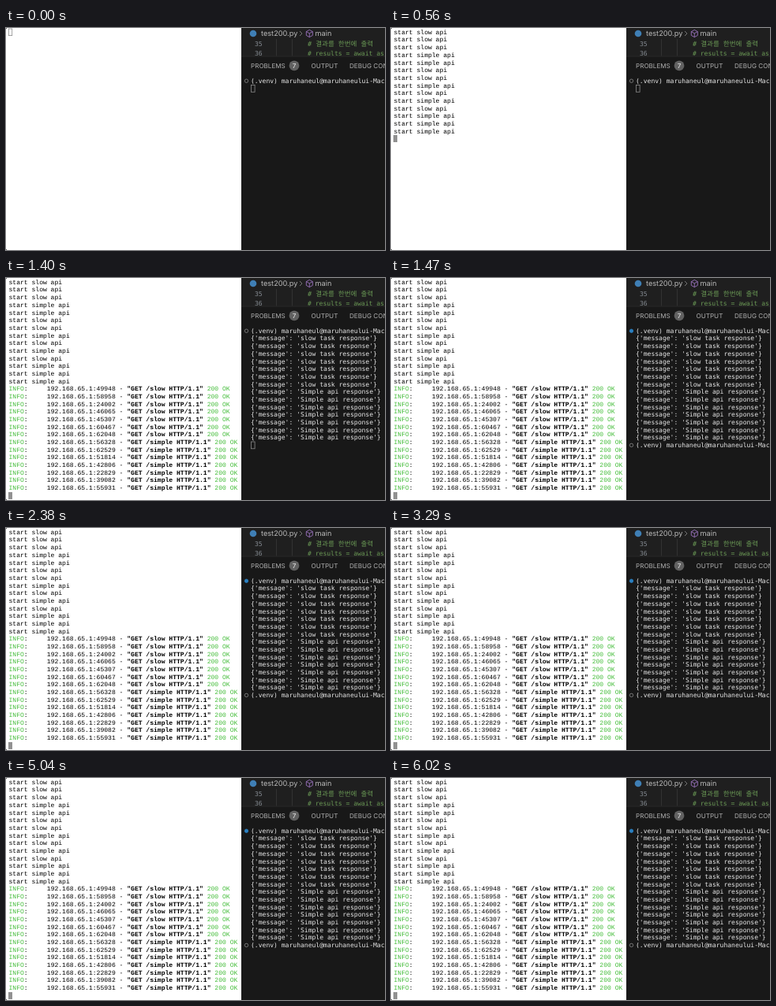
An HTML page for the animation above (6090 ms loop, 480 by 282 pixels).

```html
<!DOCTYPE html>
<html lang="en">
<head>
<meta charset="utf-8">
<title>Async requests in two terminals</title>
<style>
html, body { margin: 0; width: 100%; height: 100%; overflow: hidden; background: #fff; }
svg { display: block; width: 480px; height: 282px; text-rendering: geometricPrecision; }
text { white-space: pre; font: 8.05px "Liberation Mono", monospace; }
.right text { font: 8.06px "DejaVu Sans Mono", "Noto Sans Mono", monospace; fill: #e8e8e8; }
.right .code { fill: #6a9955; }
.right .korean { font-family: "DejaVu Sans Mono", "Noto Sans CJK KR", "Noto Sans CJK JP", sans-serif; font-size: 8.5px; }
.right .num { fill: #858b92; }
.right .ui { font: 9.2px Inter, Roboto, sans-serif; fill: #b9b9b9; }
.right .tab { font: 8.1px Inter, Roboto, sans-serif; fill: #b0b0b0; }
.ok { fill: #45bd3b; }
.bold { font-weight: bold; }
.line { fill: none; stroke: #8c8c8c; stroke-width: .8; }
</style>
</head>
<body>
<svg viewBox="0 0 480 282">
  <rect width="480" height="282" fill="#fff"/>
  <path d="M0 0h1v1h-1zM0 281h1v1h-1z" fill="#555"/>
  <g id="server"></g>
  <g class="right">
    <rect x="298" width="182" height="282" fill="#181818"/>
    <rect x="298" width="182" height="36" fill="#1f1f1f"/>
    <path d="M342.5 14V36M362.5 14V36" stroke="#383838" stroke-width=".8"/>
    <circle cx="313" cy="7" r="4.3" fill="#3f7fb5"/>
    <text class="ui" x="323" y="10.2">test200.py</text>
    <path class="line" d="M372 4l3 3l-3 3"/>
    <path class="line" style="stroke:#a77bd0" d="M384.3 2.4l4 2.2v4.8l-4 2.2l-4-2.2v-4.8zM380.3 4.6l4 2.2l4-2.2M384.3 6.8v4.8"/>
    <text class="ui" x="391.5" y="10.2">main</text>
    <text class="num" x="315" y="23">35</text>
    <text class="num" x="315" y="35">36</text>
    <text class="code korean" x="382" y="23"># 결과를 한번에 출력</text>
    <text class="code" x="382" y="35"># results = await as</text>
    <rect x="298" y="35.5" width="182" height="246.5" fill="#181818"/>
    <path d="M298 36H480" stroke="#2b2b2b"/>
    <text class="tab" x="310" y="51">PROBLEMS</text>
    <circle cx="365" cy="47.8" r="6.4" fill="#616161"/>
    <text class="tab" x="362.7" y="50.8" style="fill:#f2f2f2">7</text>
    <text class="tab" x="386.5" y="51">OUTPUT</text>
    <text class="tab" x="435" y="51">DEBUG CONSOLE</text>
    <g id="client"></g>
  </g>
</svg>
<script>
const LOOP = 6090, ROW = 9.68;
const STARTED = 350, SLOW = 910, SIMPLE = 1400, DONE = 1470;
const server = document.getElementById('server');
const client = document.getElementById('client');
const timed = [];

function add(parent, markup, from = 0, to = LOOP) {
  parent.insertAdjacentHTML('beforeend', markup);
  timed.push({ el: parent.lastElementChild, from, to });
}
const serverRow = (row, html, from) =>
  add(server, `<text x="3.5" y="${7.8 + row * ROW}">${html}</text>`, from);
const clientRow = (row, html, from) =>
  add(client, `<text x="310" y="${69.8 + row * ROW}">${html}</text>`, from);

function serverCursor(row, from, to) {
  add(server, `<rect x="3" y="${Math.round(.8 + row * ROW)}" width="5" height="9" fill="#919191"/>`, from, to);
}
function clientCursor(row, from, to) {
  add(client, `<rect class="line" x="310.5" y="${62.8 + row * ROW}" width="4.6" height="8.8"/>`, from, to);
}
function dot(row, from, to, style = '') {
  add(client, `<circle class="line" style="${style}" cx="304.5" cy="${67.2 + row * ROW}" r="2.2"/>`, from, to);
}

// Server log: s = slow call, q = simple call
[...'sssqqssqsqsqqq'].forEach((kind, row) =>
  serverRow(row, `start ${kind === 's' ? 'slow' : 'simple'} api`, STARTED));

const ports = [49948, 58958, 24002, 46065, 45307, 60467, 62048,
  56328, 62529, 51814, 42806, 22829, 39082, 55931];
ports.forEach((port, i) => {
  const slow = i < 7;
  const from = slow ? SLOW : SIMPLE;
  serverRow(14 + i, `<tspan class="ok">INFO</tspan>:     192.168.65.1:${port} - ` +
    `<tspan class="bold">"GET /${slow ? 'slow' : 'simple'} HTTP/1.1"</tspan> ` +
    '<tspan class="ok">200 OK</tspan>', from);
  clientRow(1 + i, `{'message': '${slow ? 'slow task' : 'Simple api'} response'}`, from);
});

add(server, '<rect class="line" x="3.5" y="1" width="4.2" height="8.6"/>', 0, 70);
serverCursor(0, 70, STARTED);
serverCursor(14, STARTED, SLOW);
serverCursor(21, SLOW, SIMPLE);
serverCursor(28, SIMPLE);

const prompt = '(.venv) maruhaneul@maruhaneului-Mac';
clientRow(0, prompt);
clientRow(15, prompt, DONE);
clientCursor(1, 0, SLOW);
clientCursor(8, SLOW, SIMPLE);
clientCursor(15, SIMPLE, DONE);
dot(0, 0, DONE);
dot(0, DONE, LOOP, 'fill:#2a7fc0;stroke:#2a7fc0');
dot(15, DONE);

const origin = performance.now();
function draw(now) {
  const t = Math.max(0, now - origin) % LOOP;
  for (const { el, from, to } of timed)
    el.style.visibility = t >= from && t < to ? 'visible' : 'hidden';
  requestAnimationFrame(draw);
}
draw(origin);
</script>
</body>
</html>
```
